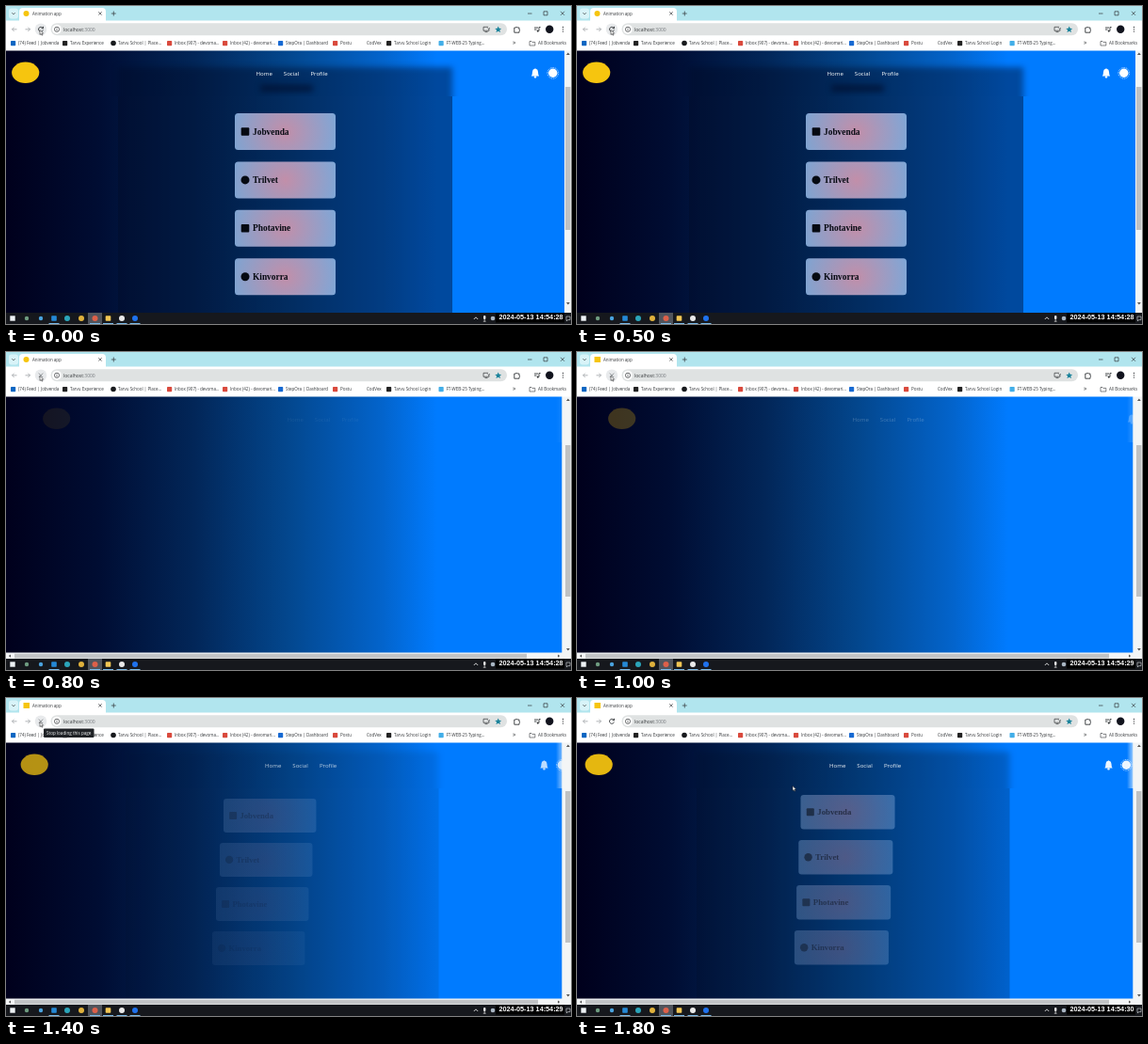
An HTML page with a canvas that plays this animation: 600 px wide and 338 px high, repeating every 1900 ms.

```html
<!DOCTYPE html>
<html lang="en">
<head>
<meta charset="utf-8">
<title>Animation app</title>
<style>
html, body { margin: 0; width: 600px; height: 338px; overflow: hidden; }
canvas { display: block; width: 600px; height: 338px; }
</style>
</head>
<body>
<canvas id="stage"></canvas>
<script>
const LOOP = 1900, STEP = 100, RELOAD = 600, LOADED = 1800;
const UI = '"Open Sans", "Noto Sans", sans-serif';
const SERIF = '"Liberation Serif", serif';
const canvas = document.getElementById('stage');
const ctx = canvas.getContext('2d');
const ratio = window.devicePixelRatio || 1;
canvas.width = 600 * ratio;
canvas.height = 338 * ratio;

// time, header shift, card alpha, first card x, x step, first card y, y step, card scale
const KEYS = [
  [700, 36, 0, 225, -6, 111, 46.4, .91],
  [1000, 27, 0, 225, -6, 111, 46.4, .91],
  [1200, 17.5, 0, 228, -5, 109, 46.7, .915],
  [1400, 9.5, .17, 231, -4, 107, 47, .92],
  [1600, 6, .27, 234, -3, 105, 47.4, .928],
  [1800, 2.5, .37, 237.5, -2.2, 103, 48, .935]
];
const SETTLED = [0, 0, .85, 243, 0, 114, 51.4, 1];

function poseAt(t) {
  if (t < RELOAD) return SETTLED;
  if (t <= KEYS[0][0]) return KEYS[0];
  const next = KEYS.findIndex(k => k[0] >= t);
  const a = KEYS[next - 1], b = KEYS[next];
  const p = (t - a[0]) / (b[0] - a[0]);
  return a.map((v, i) => v + (b[i] - v) * p);
}

function rect(x, y, w, h, color, radius = 0) {
  ctx.fillStyle = color;
  ctx.beginPath();
  ctx.roundRect(x, y, w, h, radius);
  ctx.fill();
}

function dot(x, y, rx, color, ry = rx) {
  ctx.fillStyle = color;
  ctx.beginPath();
  ctx.ellipse(x, y, rx, ry, 0, 0, Math.PI * 2);
  ctx.fill();
}

function text(label, x, y, size, color, family = UI, weight = 400) {
  ctx.font = `${weight} ${size}px ${family}`;
  ctx.fillStyle = color;
  ctx.fillText(label, x, y);
}

function stroke(path, color, width = .7) {
  ctx.strokeStyle = color;
  ctx.lineWidth = width;
  ctx.stroke(new Path2D(path));
}

function fillPath(path, color) {
  ctx.fillStyle = color;
  ctx.fill(new Path2D(path));
}

function scoped(draw) {
  ctx.save();
  draw();
  ctx.restore();
}

function clip(x, y, w, h) {
  ctx.beginPath();
  ctx.rect(x, y, w, h);
  ctx.clip();
}

function drawBackdrop() {
  const g = ctx.createLinearGradient(0, 0, 600, 0);
  [[0, '#00001c'], [100, '#000d33'], [200, '#022658'], [300, '#03478e'],
   [400, '#0364cc'], [458, '#007bff']].forEach(([x, c]) => g.addColorStop(x / 600, c));
  rect(0, 47, 600, 279, g);
}

function drawPanel(settled, alpha) {
  const [x, y, right] = settled ? [119, 65, 474] : [127, 57, 459.5];
  const color = `rgba(0,13,40,${settled ? .45 : alpha * .65})`;
  scoped(() => {
    clip(0, 96, 600, 230);
    rect(x, y, right - x, 300, color);
  });
  // The header blurs whatever lies behind it
  scoped(() => {
    clip(0, 47, 600, 49);
    ctx.filter = `blur(${3 * ratio}px)`;
    rect(x, y, right - x, 60, color);
    if (settled) rect(270, 84, 56, 7, 'rgba(0,8,35,.6)', 3);
  });
}

function drawCards([, , alpha, left, dx, top, dy, scale]) {
  ['Jobvenda', 'Trilvet', 'Photavine', 'Kinvorra'].forEach((name, i) => scoped(() => {
    const a = alpha === SETTLED[2] ? alpha : Math.max(0, alpha - .035 * i);
    ctx.translate(left + dx * i, top + dy * i);
    ctx.scale(scale, scale);
    ctx.globalAlpha = a;
    const g = ctx.createRadialGradient(53.5, 19.5, 0, 53.5, 19.5, 57);
    g.addColorStop(0, 'rgb(228,160,182)');
    g.addColorStop(1, 'rgb(148,187,233)');
    rect(0, 0, 107, 39, g, 3.5);
    ctx.globalAlpha = Math.min(1, a * 1.5);
    if (i % 2) dot(11, 19.5, 4.5, '#060a12');
    else rect(6.7, 15.2, 8.6, 8.6, '#060a12', 1);
    text(name, 19, 22.6, 9.4, '#060a12', SERIF, 700);
  }));
}

function drawHeader(shift, settled) {
  scoped(() => {
    ctx.globalAlpha = 1 - shift / 36;
    if (!settled) {
      const glow = ctx.createLinearGradient(584, 0, 591, 0);
      glow.addColorStop(0, 'rgba(255,255,255,0)');
      glow.addColorStop(1, 'rgba(255,255,255,.7)');
      rect(584, 47, 7, 49, glow);
    }
    ctx.translate(shift, 0);
    dot(20.7, 70.8, 14.6, '#f6c50f', 11.2);
    text('Home', 265.6, 74.4, 6.1, '#fff', UI, 500);
    text('Social', 294.8, 74.4, 6.1, '#fff', UI, 500);
    text('Profile', 323.4, 74.4, 6.1, '#fff', UI, 500);
    fillPath('M557.8 74.4 Q559 73 559 70 Q559 67.2 561.4 66.8 Q562 65.6 562.6 66.8 Q565 67.2 565 70 Q565 73 566.2 74.4Z', '#fff');
    dot(562, 75.4, 1.2, '#fff');
    dot(580.8, 71.3, 4.7, '#fff');
    ctx.setLineDash([1, .8]);
    stroke('M575 71.3a5.8 5.8 0 1 0 11.6 0a5.8 5.8 0 1 0 -11.6 0', '#fff', .7);
  });
}

function drawScrollbars(t) {
  if (t < RELOAD) {
    rect(593, 47, 7, 279, '#f3f5f6');
    rect(594, 86, 5.4, 152, '#bfc1c3');
  } else {
    rect(590.3, 47, 9.7, 279, '#f3f5f6');
    rect(594, 99, 5.4, 161, '#bfc1c3');
    rect(0, 319.6, 600, 6.4, '#f3f5f6');
    rect(9, 320.7, t < 1000 ? 544 : 556, 4.8, '#c1c3c5');
    fillPath('M5 321.5v3.2l-2.2-1.6zM586 321.5v3.2l2.2-1.6z', '#555');
  }
  fillPath('M595 52h3.8l-1.9-2.4zM595 315h3.8l-1.9 2.4z', '#555');
}

function drawBrowser(t) {
  const ink = '#333639';
  rect(0, 0, 600, 18, '#b1e5ee');
  rect(3, 2.5, 10, 11, '#d8f3f8', 3);
  stroke('M6.3 7.2l1.7 1.7l1.7-1.7M111.8 8h5M114.3 5.5v5', ink);
  rect(14, 2, 92, 16, '#fff', [4, 4, 0, 0]);
  if (t < 1000) dot(21.5, 8, 3, '#f6c50f');
  else rect(18.5, 5, 6.5, 6, '#f6c50f');
  text('Animation app', 28, 9.7, 4.5, ink);
  stroke('M98.3 6.2l3.4 3.4m0-3.4l-3.4 3.4M554 8h4.5M571 5.8h4v4h-4zM589 5.8l4 4m0-4l-4 4', ink);

  rect(0, 15.5, 600, 32, '#fff');
  stroke('M11.5 24.8h-5m2.2-2.2l-2.2 2.2l2.2 2.2M20.5 24.8h5m-2.2-2.2l2.2 2.2l-2.2 2.2', '#92979b');
  if (t < 1500) dot(37, 24.8, 6.3, '#e8eaec');
  const loading = t >= RELOAD && t < LOADED;
  if (loading) stroke('M34.8 22.6l4.4 4.4m0-4.4l-4.4 4.4', '#777b7f', .8);
  else stroke('M39.1 23.4a2.5 2.5 0 1 0 .3 2.2M39.5 21.8v2h-2', ink, .9);
  rect(47.5, 18.2, 484.5, 13, '#dfe2e2', 6.5);
  dot(54, 24.8, 5, '#fff');
  stroke('M51.4 24.8a2.6 2.6 0 1 0 5.2 0a2.6 2.6 0 1 0 -5.2 0M54 24.4v1.8M54 23v.6', ink, .7);
  text('localhost', 61, 26.7, 5, ink);
  const hostEnd = 61 + ctx.measureText('localhost').width;
  text(':3000', hostEnd, 26.7, 5, '#777b7f');
  stroke('M512 22.3h-5v4h6v-2M508.5 27.6h3M511.5 23.6l1 1l1.2-1.6', ink);
  fillPath('M522.7 21.4l1 2.3l2.5.2l-1.9 1.7l.6 2.5l-2.2-1.4l-2.2 1.4l.6-2.5l-1.9-1.7l2.5-.2z', '#18829a');
  stroke('M539.8 23h1.6q.8-2 1.8 0h1.8v2q1.6.8 0 1.6v1.6h-5.2z', ink, .9);
  stroke('M561 23h4M561 25h2.5M566 26.5v-4h1.6', ink, .9);
  dot(564.8, 26.6, 1.1, ink);
  dot(577.2, 24.8, 4.2, '#11131d');
  [22.5, 24.8, 27.1].forEach(y => dot(591.5, y, .65, ink));

  const bookmarks = [
    [13, '(74) Feed | Jobvenda', '#0a66c2'], [68, 'Tarvu Experience', '#222'],
    [119, 'Tarvu School | Place...', '#17191c', true], [179, 'Inbox (907) - devoma...', '#d94a3d'],
    [238, 'Inbox (42) - devomari...', '#d94a3d'], [297, 'StepOra | Dashboard', '#1769d2'],
    [355, 'Postu', '#d94a3d'], [383, 'CodVex'],
    [412, 'Tarvu School Login', '#222'], [467.5, 'FT-WEB-25 Typing...', '#42aee8']
  ];
  bookmarks.forEach(([x, label, color, round]) => {
    if (round) dot(x - 5, 39.5, 2.8, color);
    else if (color) rect(x - 8, 37, 5.2, 5.2, color, .7);
    text(label, x, 41.2, 4.5, ink);
  });
  text('»', 538, 41.4, 6.5, ink);
  stroke('M556 37.5h2l.8.9h3v3.6h-5.8z', ink, .6);
  text('All Bookmarks', 565, 41.2, 4.5, ink);
}

function drawTaskbar(t) {
  rect(0, 326, 600, 12, '#16181d');
  rect(87, 326, 15, 12, '#50545c');
  rect(4.3, 329.3, 5.4, 5.4, '#eef2f5');
  [[22, '#6f9c80'], [37, '#4aa3df'], [51, '#2589d6'], [65, '#2ba5ba'], [80, '#e0b13c'],
   [94.5, '#dd604a'], [108.5, '#f2c654'], [123, '#e9e9e9'], [137, '#1f72ee']].forEach(([x, color], i) => {
    if (i === 2 || i === 6) rect(x - 2.8, 329.2, 5.6, 5.6, color, .8);
    else dot(x, 332, i < 2 ? 2.2 : 3, color);
  });
  [51, 94.5, 108.5, 123, 137].forEach(x => rect(x - 5.5, 337, 11, 1, '#79b9e8'));
  stroke('M496.8 333l2.2-2.2l2.2 2.2', '#fff', .8);
  rect(507, 329, 2.4, 4, '#e9e9e9', 1);
  stroke('M508.2 333v2.2M506.8 335.2h2.8', '#e9e9e9');
  dot(517, 332, 2.3, '#a9b6c3');
  stroke('M595 330h4v3.6h-2.4l-1.2 1.4v-1.4h-.4z', '#dfe3e6', .6);
  rect(520, 326, 73, 10.5, '#000');
  const second = t < 1000 ? 28 : t < 1800 ? 29 : 30;
  text(`2024-05-13 14:54:${second}`, 523.5, 333.3, 7.25, '#fff', '"Liberation Sans", sans-serif', 700);
}

function drawTooltip(t) {
  const reload = t >= 600 && t < 800;
  if (!reload && !(t >= 1300 && t < 1700)) return;
  rect(40, 32.5, reload ? 41 : 53.5, 9.6, '#202327', 1);
  text(reload ? 'Reload this page' : 'Stop loading this page', 43, 38.9, 4.6, '#f1f3f4');
}

function drawCursor(t) {
  const path = [[1400, 36, 25.5], [1600, 76, 42], [1800, 229, 93.5]];
  const i = t < 1600 ? 0 : 1;
  const [t0, x0, y0] = path[i], [t1, x1, y1] = path[i + 1];
  const p = Math.max(0, (t - t0) / (t1 - t0));
  scoped(() => {
    ctx.translate(x0 + (x1 - x0) * p, y0 + (y1 - y0) * p);
    const arrow = 'M0 0v5l1.2-1.1l.8 1.8l.9-.4l-.8-1.7h1.5z';
    fillPath(arrow, '#fff');
    stroke(arrow, '#111', .5);
  });
}

function render(t) {
  const settled = t < RELOAD;
  const pose = poseAt(t);
  ctx.setTransform(ratio, 0, 0, ratio, 0, 0);
  drawBackdrop();
  drawPanel(settled, pose[2]);
  drawCards(pose);
  drawHeader(pose[1], settled);
  drawScrollbars(t);
  drawBrowser(t);
  drawTaskbar(t);
  drawTooltip(t);
  drawCursor(t);
}

const start = performance.now();
function tick() {
  const t = (performance.now() - start) % LOOP;
  render(Math.floor(t / STEP) * STEP);
  requestAnimationFrame(tick);
}
tick();
</script>
</body>
</html>
```
